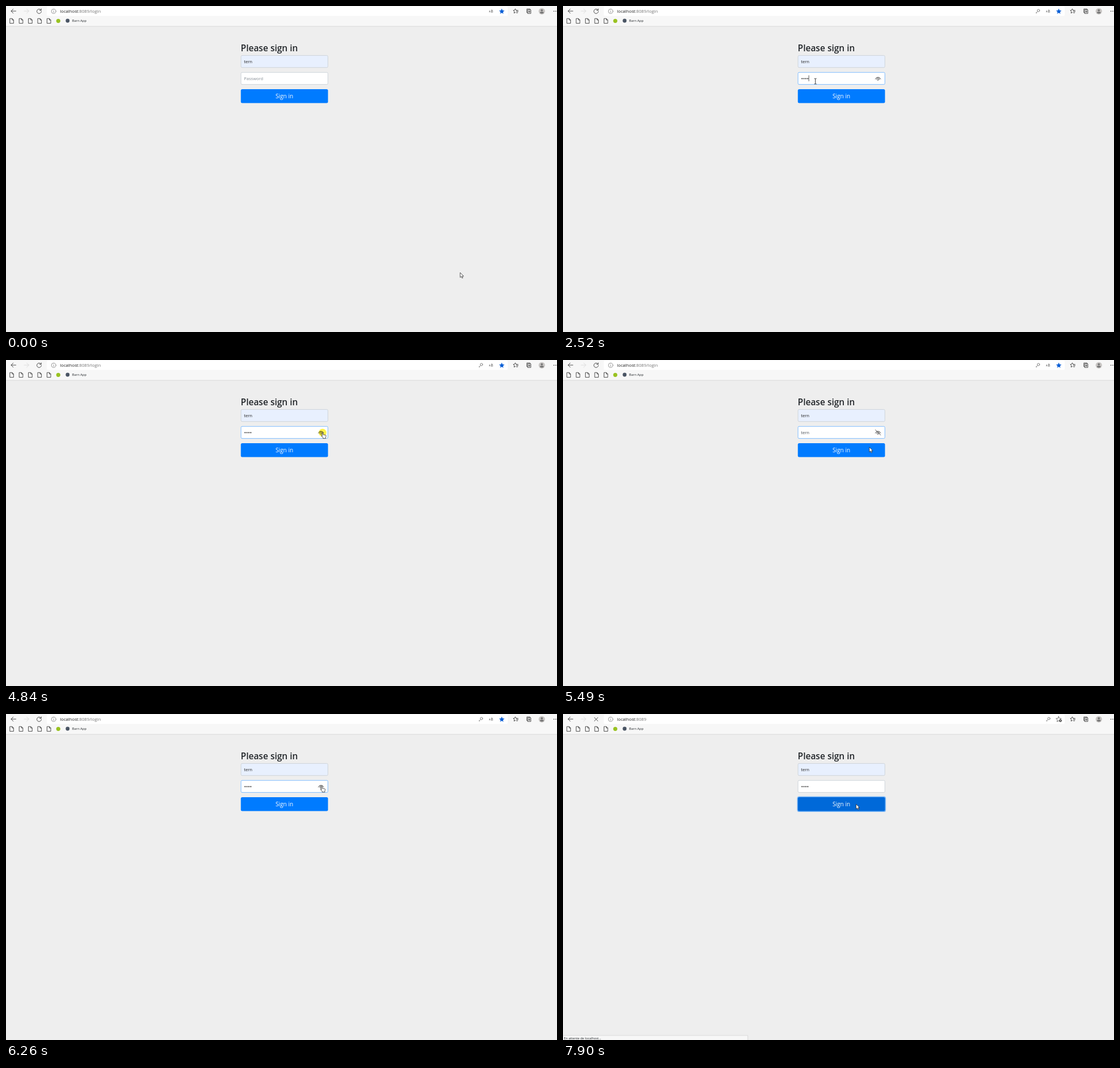
Animation, 973 px wide and 576 px high, one loop 8000 ms. Source, as an HTML page:

```html
<!DOCTYPE html>
<html lang="en">
<head>
<meta charset="utf-8">
<title>Sign in</title>
<style>
  html, body { margin: 0; width: 100%; height: 100%; overflow: hidden; background: #eee; }
  svg { display: block; width: 100%; height: 100%; }
  text { font-family: "Open Sans", "Noto Sans", sans-serif; fill: #212529; white-space: pre; }
  .icon { fill: none; stroke: #3c3c3c; stroke-width: .9; stroke-linecap: round; stroke-linejoin: round; }
  .field { fill: #fff; stroke: #ced4da; stroke-width: 1; }
  .input { font-size: 7.7px; fill: #495057; }
  .pointer { fill: #fff; stroke: #222; stroke-width: .75; stroke-linejoin: round; }
</style>
</head>
<body>
<svg viewBox="0 0 973 576" preserveAspectRatio="none">
  <defs>
    <path id="page" d="M-3-4.2H.8L3.2-1.7V4.2H-3ZM.8-4V-1.6H3"/>
    <path id="star" d="M0-4.6 1.4-1.5 4.7-1.1 2.2 1.2 2.9 4.5 0 2.8-2.9 4.5-2.2 1.2-4.7-1.1-1.4-1.5Z"/>
  </defs>

  <rect width="973" height="36" fill="#f7f7f7"/>
  <rect x="72" y="1" width="814" height="16.5" rx="2" fill="#fff"/>
  <path d="M0 36H973" stroke="#d9d9d9"/>

  <g class="icon">
    <path d="M17.5 9H9M12.8 5.2 9 9l3.8 3.8"/>
    <path d="M32 9h8.3M36.6 5.2 40.4 9l-3.8 3.8" stroke="#dadada"/>
    <path id="reload" d="M62 7.4A4 4 0 1 0 62.5 9.6M62.2 4.9V7.6H59.4"/>
    <path id="stop" d="M55.4 6.2l6.2 6.2M61.6 6.2l-6.2 6.2"/>
    <g stroke="#777" stroke-width=".75">
      <circle cx="84.2" cy="9.3" r="4"/>
      <path d="M84.2 8.9v2.4M84.2 7.1v.1"/>
    </g>
    <g id="key" stroke="#666" stroke-width=".8">
      <circle cx="1.2" cy="-1.2" r="2.1"/>
      <path d="M-.4.4-3.2 3.2M-2.6 2.6l.9.9"/>
    </g>
    <use id="addStar" href="#star" x="875.3" y="9.1" stroke="#555" stroke-width=".8"/>
    <g id="plus" stroke="#333" stroke-width=".8">
      <circle cx="878.4" cy="11.7" r="2" fill="#555"/>
      <path d="M877.4 11.7h2M878.4 10.7v2" stroke="#fff" stroke-width=".5"/>
    </g>
    <path d="M902.2 7.6 900.6 7.4 899.4 4.9 898.2 7.4 895.8 7.8 897.6 9.6 897.2 12.6 899.6 11.3M901.4 7.9h3M901.4 9.9h3M901.4 12h2"/>
    <path d="M921 11.6h-1.2V5.2h5.6v1.2M921.4 6.8h5.4v6.4h-5.4ZM924.1 8.3v3.4M922.4 10h3.4"/>
  </g>
  <use id="favourite" href="#star" x="875.5" y="9.2" fill="#0a5fd6"/>
  <text id="translate" x="852.6" y="11.2" font-size="5.2" style="font-family:'Noto Sans CJK JP','Noto Sans CJK',sans-serif;fill:#555">aあ</text>
  <circle cx="946.2" cy="9.3" r="5.6" fill="#c9c6c4"/>
  <circle cx="946.2" cy="7.6" r="1.9" fill="#777"/>
  <path d="M942.8 12.3a3.4 2.2 0 0 1 6.8 0q-3.4 2.6-6.8 0" fill="#777"/>
  <g fill="#333"><circle cx="967.4" cy="9.3" r=".75"/><circle cx="970.2" cy="9.3" r=".75"/><circle cx="973" cy="9.3" r=".75"/></g>

  <text x="95.3" y="12.4" font-size="7.7"><tspan fill="#222">localhost</tspan><tspan fill="#767676">:8089</tspan><tspan id="path" fill="#767676">/login</tspan></text>

  <g class="icon">
    <use href="#page" x="10.2" y="26.4"/><use href="#page" x="26.6" y="26.4"/><use href="#page" x="43" y="26.4"/>
    <use href="#page" x="59.4" y="26.4"/><use href="#page" x="75.8" y="26.4"/>
  </g>
  <circle cx="92.3" cy="26.3" r="3.6" fill="#99c221"/>
  <circle cx="108.8" cy="26" r="3.4" fill="#4a5564"/>
  <text x="116.8" y="28.2" font-size="5.8">Barn App</text>

  <text x="414.6" y="80" font-size="15.5" font-weight="600">Please sign in</text>
  <rect class="field" x="415" y="87.4" width="153.4" height="21.3" rx="2" style="fill:#e8f0fe"/>
  <text class="input" x="420.2" y="101" style="fill:#222">tern</text>
  <rect id="password" class="field" x="415" y="117.3" width="153.4" height="21.3" rx="2"/>
  <text id="hint" class="input" x="420.2" y="130.9" style="font-size:7.55px;fill:#868e96">Password</text>
  <text id="plain" class="input" x="420.2" y="130.9">tern</text>
  <g id="dots" fill="#333"></g>
  <rect id="caret" y="122.5" width=".8" height="10.5" fill="#333"/>
  <g id="eye" class="icon" stroke-width="1">
    <path d="M551.6 129.2a4.9 4.9 0 0 1 9.3 0"/>
    <circle cx="556.2" cy="129.2" r="1.9"/>
    <path id="slash" d="M551.6 123.4l9.4 9.2"/>
  </g>
  <rect id="ring" x="413.4" y="145.6" width="156.8" height="27.4" rx="3.6" fill="#78b5f6"/>
  <rect id="button" x="414.7" y="147" width="153.9" height="24.5" rx="2.5"/>
  <text x="491.6" y="163.4" font-size="10.1" text-anchor="middle" style="fill:#fff">Sign in</text>

  <g id="status">
    <path d="M-1 568H326.3V577H-1Z" fill="#f7f7f7" stroke="#d2d2d2" stroke-width=".8"/>
    <text x="1.6" y="575.2" font-size="5.75">En attente de localhost...</text>
  </g>

  <circle id="click" r="6.8" fill="#fff01e" opacity=".8" style="mix-blend-mode:multiply"/>
  <g id="cursor">
    <path id="arrow" class="pointer" d="M0 0V8.6L2 6.8 3.4 9.9 4.8 9.2 3.5 6.3H6.1Z"/>
    <path id="beam" fill="none" stroke="#222" stroke-width=".9" d="M-2-4.8H-.6L0-4.4.6-4.8H2M0-4.4V4.4M-2 4.8H-.6L0 4.4.6 4.8H2"/>
    <path id="hand" class="pointer" d="M-.8 7V.8Q0-.5 .9.8V4.3L5.2 5.1Q6.3 5.4 6.2 6.6L5.4 9.2V11H.8V9.6L-1.9 6.7Q-1.9 5.5-.8 6.4Z"/>
  </g>
</svg>
<script>
const LOOP = 8000;
const el = id => document.getElementById(id);
const show = (id, on) => { el(id).style.display = on ? '' : 'none'; };
const within = (t, ...spans) => spans.some(([from, to]) => t >= from && t < to);
const latest = (steps, t) => steps.findLast(step => step[0] <= t);

// time, x, y, shape
const pointer = [
  [0, 802, 471, 'arrow'], [100, 775, 440, 'arrow'], [210, 690, 350, 'arrow'],
  [320, 585, 248, 'arrow'], [440, 480, 160, 'arrow'], [550, 402, 102.5, 'arrow'],
  [660, 424, 122, 'beam'], [770, 440, 131, 'beam'], [880, 445.7, 133, 'beam'],
  [3290, 449, 133.5, 'beam'], [3400, 460, 135, 'beam'], [3510, 478, 136.5, 'beam'],
  [3620, 500, 137, 'beam'], [3730, 522, 136, 'beam'], [3840, 540, 133, 'beam'],
  [3950, 552, 130, 'beam'], [4060, 560, 127, 'beam'],
  [4170, 561, 120.5, 'hand'], [4280, 560.2, 122, 'hand'], [4510, 559, 127.6, 'hand'],
  [5170, 557, 127, 'hand'], [5280, 552, 140, 'arrow'], [5380, 546, 150, 'arrow'],
  [5490, 541, 154, 'arrow'], [5620, 538, 149, 'arrow'], [5720, 536.6, 141, 'arrow'],
  [5820, 543, 134, 'beam'], [5930, 552, 130, 'beam'], [6040, 557.5, 127, 'hand'],
  [6390, 555, 128, 'hand'], [6480, 546, 139.5, 'arrow'], [6600, 536, 143, 'arrow'],
  [6710, 528, 147, 'arrow'], [6820, 520.8, 153, 'arrow'], [6930, 518.5, 156, 'arrow'],
  [7020, 517.6, 157.5, 'arrow'], [7900, 517.6, 159.3, 'arrow']
];
const typed = [[0, 0], [1870, 1], [1990, 2], [2210, 3], [2520, 4]];
const dotStep = 3.35;

el('dots').innerHTML = Array.from({ length: 4 }, (_, i) =>
  `<circle cx="${422.2 + i * dotStep}" cy="128.3" r="1.1"/>`).join('');

function draw(t) {
  const [, x, y, shape] = latest(pointer, t);
  el('cursor').setAttribute('transform', `translate(${x} ${y})`);
  for (const id of ['arrow', 'beam', 'hand']) show(id, id === shape);

  show('click', within(t, [880, 990], [4730, 4950], [6150, 6260], [7260, 7350]));
  el('click').setAttribute('transform', `translate(${x} ${shape === 'hand' ? y + .8 : y})`);

  const count = latest(typed, t)[1];
  const revealed = within(t, [4950, 6260]);
  show('hint', count === 0);
  show('plain', revealed);
  show('dots', !revealed);
  [...el('dots').children].forEach((dot, i) => { dot.style.display = i < count ? '' : 'none'; });
  show('caret', within(t, [990, 1440], [1870, 3070], [3620, 4170]));
  el('caret').setAttribute('x', 420.3 + count * dotStep);

  const submitted = t >= 7260, loading = t >= 7350, waiting = t >= 7680;
  el('password').style.stroke = within(t, [990, 7260]) ? '#80bdff' : '#ced4da';
  show('eye', count > 0 && !submitted);
  show('slash', revealed);
  el('button').style.fill = within(t, [5620, 5820], [6600, LOOP]) ? '#0069d9' : '#007bff';
  show('ring', submitted);

  show('reload', !loading);
  show('stop', loading);
  show('path', !waiting);
  show('status', waiting);
  show('favourite', !waiting);
  show('addStar', waiting);
  show('plus', waiting);
  show('translate', !waiting);
  show('key', t >= 1990);
  el('key').setAttribute('transform', `translate(${waiting ? 856.8 : 838.4} 9.2)`);
}

function tick() {
  draw(performance.now() % LOOP);
  requestAnimationFrame(tick);
}
tick();
</script>
</body>
</html>
```
